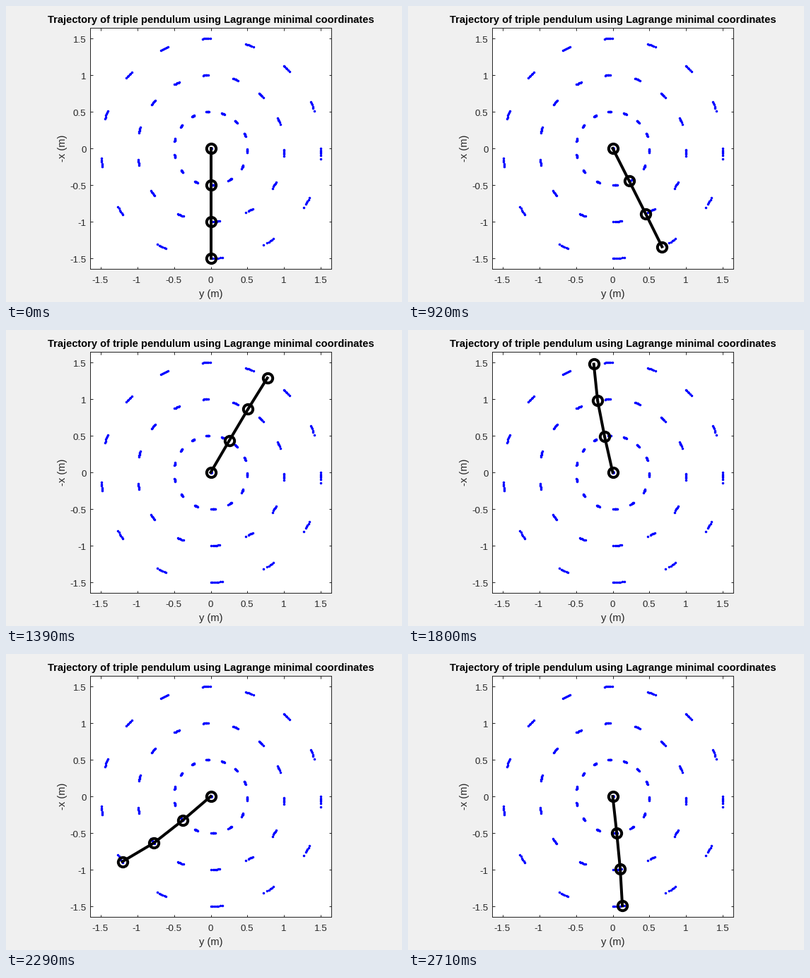
Recreate the animation shown at these times as a matplotlib script. Size 560 by 420 pixels, loop 2780 ms.

```python
import numpy as np
import matplotlib.pyplot as plt
from matplotlib.animation import FuncAnimation

W, H, DPI = 560, 420, 100
PX = 72 / DPI                      # points per pixel
INK = "#262626"
LENGTH = 0.5                       # metres per link
TICKS = [-1.5, -1, -0.5, 0, 0.5, 1, 1.5]

# How long each pose is held, in ms
HOLDS = [260, 390] + [70, 60, 70, 70, 60, 70, 70, 70] * 2 + [70] * 15
TICK_MS = 10
ENDS = np.cumsum(HOLDS) // TICK_MS

# Time phase of the rotation in degrees at a few poses
KEY_POSE = [0, 1, 2, 4, 6, 13, 14, 19, 21, 23, 26, 29, 31, 32]
KEY_PHASE = [0, 43, 112, 251, 382.9, 864.9, 935.5, 1271.3,
             1410, 1544.2, 1753.1, 1958.2, 2097.4, 2164.3]
PHASES = np.interp(np.arange(len(HOLDS)), KEY_POSE, KEY_PHASE)


def swing_angle(phase):
    """Angle from straight down; gravity makes the bottom faster than the top."""
    phase = np.radians(phase)
    angle = phase
    for _ in range(12):
        angle = phase + np.radians(8.2) * np.sin(angle)
    return angle


def joints(phase):
    """Coordinates of the pivot and the three bobs."""
    angle = swing_angle(phase)
    bend = 1.9 - 3.1 * np.sin(angle) - 0.4 * np.cos(angle)
    bend *= np.radians(min(1, phase / 90))
    links = angle + bend * np.array([1, 0.4, -1.4])
    x = np.concatenate([[0], np.cumsum(LENGTH * np.sin(links))])
    y = np.concatenate([[0], np.cumsum(-LENGTH * np.cos(links))])
    return x, y


def label(x, y, text, size, color=INK, ha="center", **kw):
    """Text with its baseline at stage pixel (x, y)."""
    fig.text(x / W, 1 - y / H, text, fontsize=size * PX, color=color,
             ha=ha, va="baseline", **kw)


plt.rcParams["font.family"] = "Liberation Sans"
fig = plt.figure(figsize=(W / DPI, H / DPI), dpi=DPI, facecolor="#f0f0f0")
left, top, width, height = 119, 31, 341, 342
ax = fig.add_axes([left / W, 1 - (top + height) / H, width / W, height / H])
ax.set(xlim=(-1.64, 1.64), ylim=(-1.644, 1.644), xticks=TICKS, yticks=TICKS)
ax.tick_params(direction="in", length=3.5 * PX, width=PX, color=INK,
               top=True, right=True, labelbottom=False, labelleft=False)
for spine in ax.spines.values():
    spine.set(color=INK, linewidth=PX)

cx, cy, unit = left + width / 2, top + height / 2, 104
for v in TICKS:
    shift = -1 if v < 0 else -0.5
    label(cx + v * unit + shift, 393, f"{v:g}", 13.33)
    label(113.5, cy - v * unit + 5.5, f"{v:g}", 13.33, ha="right")
label(290, 24, "Trajectory of triple pendulum using Lagrange minimal coordinates",
      14.67, color="black", weight="bold")
label(cx, 413, "y (m)", 14.67)
label(84, cy, "-x (m)", 14.67, rotation=90, rotation_mode="anchor")

# Sampled trajectory of the three bobs
k = np.arange(85)
samples = 25.776 * k - 0.6 * k * np.exp(1 - k / 2)
trail = np.array([joints(p) for p in samples])
ax.plot(trail[:, 0].ravel(), trail[:, 1].ravel(), "o", color="blue",
        ms=3.5 * PX, mew=0)

rod, = ax.plot([], [], "o-", color="black", lw=4 * PX, ms=13.33 * PX,
               mfc="none", mec="black", mew=4 * PX, zorder=3)


def update(i):
    pose = np.searchsorted(ENDS, i, side="right")
    rod.set_data(*joints(PHASES[pose]))
    return rod,


anim = FuncAnimation(fig, update, frames=int(ENDS[-1]), interval=TICK_MS,
                     repeat=True, repeat_delay=0)
plt.show()
```
